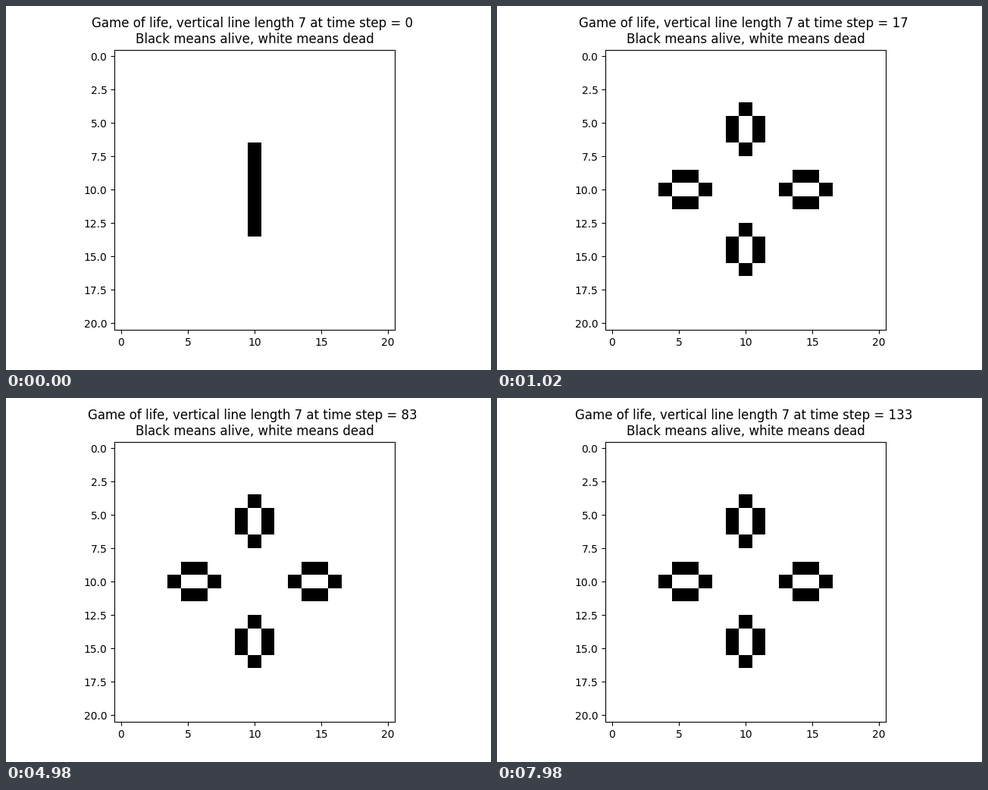
A matplotlib script for the animation above (8 s loop, 640 px wide and 480 px high).

```python
import matplotlib.pyplot as plt
import numpy as np
from matplotlib.animation import FuncAnimation

SIZE = 21
LENGTH = 7
TICK = 20          # ms per animation frame
TICKS_PER_STEP = 3
FRAMES = 400


def next_generation(grid):
    """Apply one step of Conway's rules."""
    neighbours = sum(
        np.roll(grid, (dy, dx), (0, 1))
        for dy in (-1, 0, 1)
        for dx in (-1, 0, 1)
        if (dy, dx) != (0, 0)
    )
    return ((neighbours == 3) | ((grid == 1) & (neighbours == 2))).astype(int)


def evolve(steps):
    grid = np.zeros((SIZE, SIZE), dtype=int)
    mid, half = SIZE // 2, LENGTH // 2
    grid[mid - half:mid + half + 1, mid] = 1
    history = [grid]
    for _ in range(steps):
        history.append(next_generation(history[-1]))
    return history


def heading(step):
    # The trailing space shifts the centred first line slightly left.
    return (f"Game of life, vertical line length {LENGTH} at time step = {step} \n"
            "Black means alive, white means dead")


history = evolve((FRAMES - 1) // TICKS_PER_STEP)

fig, ax = plt.subplots(figsize=(6.4, 4.8), dpi=100)
image = ax.imshow(history[0], cmap="binary", vmin=0, vmax=1)
ax.set_xticks(np.arange(0, 21, 5))
ax.set_yticks(np.arange(0, 20.1, 2.5))
title = ax.set_title(heading(0), y=1.0)


def update(frame):
    step = frame // TICKS_PER_STEP
    image.set_data(history[step])
    title.set_text(heading(step))
    return image, title


anim = FuncAnimation(fig, update, frames=FRAMES, interval=TICK,
                     repeat=True, repeat_delay=0, blit=False)
plt.show()
```
